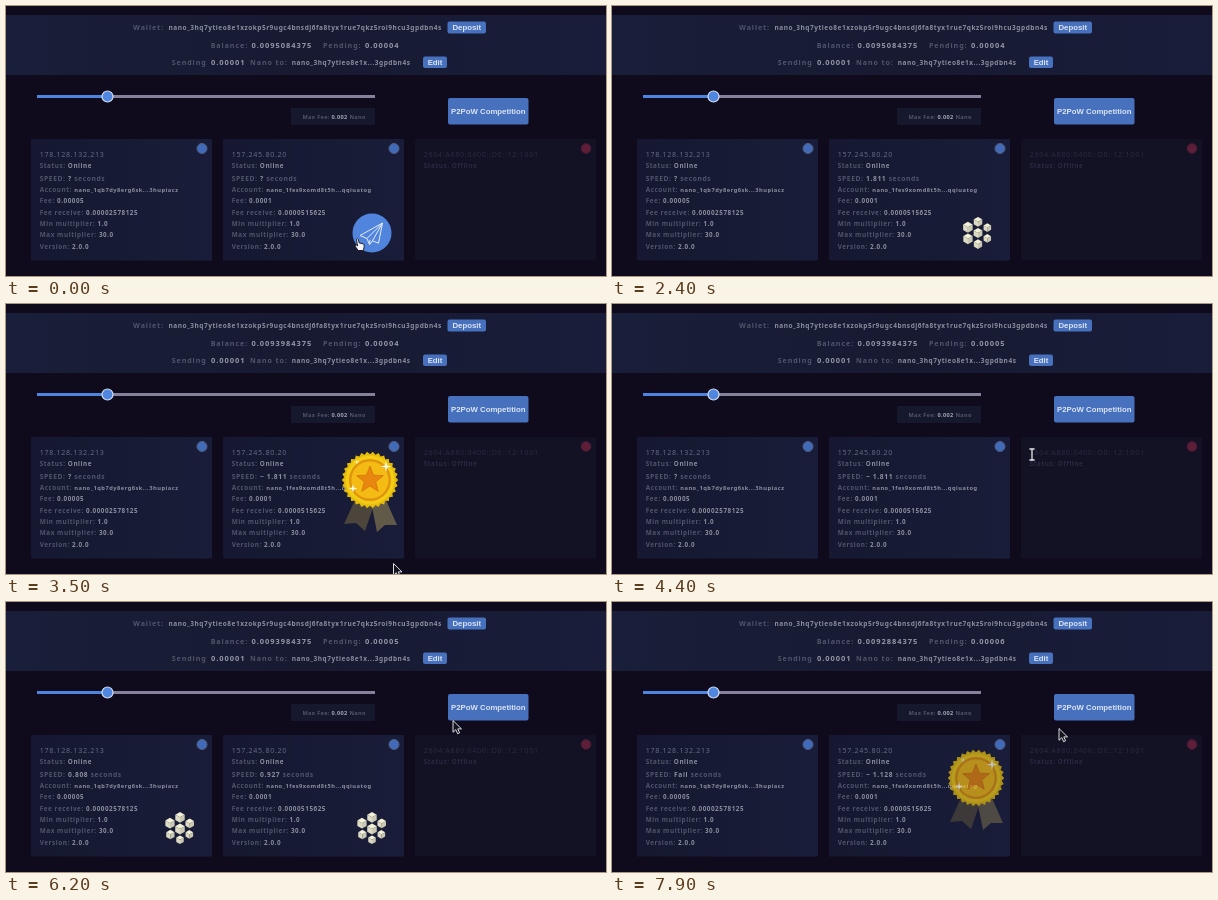
An HTML page that plays this animation: 600x270 px, repeating every 8000 ms.

```html
<!DOCTYPE html>
<html lang="en">
<head>
<meta charset="utf-8">
<title>P2PoW Competition</title>
<style>
html, body { margin: 0; width: 100%; height: 100%; overflow: hidden; background: #0f0b1d; }
svg { display: block; width: 600px; height: 270px; }
text { font-family: "Noto Sans", "Open Sans", sans-serif; font-weight: 600; white-space: pre; fill: #51556b; }
.v { font-weight: 700; fill: #8c8f9f; }
.head { font-size: 7.1px; letter-spacing: .92px; }
.head.v { font-size: 7.5px; letter-spacing: .95px; fill: #9598a8; }
.head.key { font-size: 6.5px; letter-spacing: .53px; fill: #8b8e9f; }
.row { font-size: 6.35px; letter-spacing: .57px; }
.row .v { font-size: 6.3px; letter-spacing: .55px; }
.row .key { font-size: 5.7px; letter-spacing: .5px; }
.speed, .speed .v { font-size: 6.7px; letter-spacing: .62px; }
.ip { font-size: 7.1px; letter-spacing: .7px; font-weight: 400; fill: #666a80; }
.off text, .off .v { fill: #292b43; }
.fee { font-size: 5.6px; letter-spacing: .33px; }
.fee .v { fill: #a5a8b6; }
.btn { font: 700 7.8px "Liberation Sans", Arial, sans-serif; fill: #dce5f6; text-anchor: middle; }
</style>
</head>
<body>
<svg id="stage" viewBox="0 0 600 270">
  <defs>
    <linearGradient id="bar">
      <stop offset="0" stop-color="#191e3a"/><stop offset=".5" stop-color="#171a31"/><stop offset="1" stop-color="#1a1d3a"/>
    </linearGradient>
    <linearGradient id="panel">
      <stop offset="0" stop-color="#151830"/><stop offset="1" stop-color="#191d39"/>
    </linearGradient>
    <clipPath id="card2"><rect x="217" y="133" width="181" height="122"/></clipPath>
  </defs>
  <rect width="600" height="270" fill="#0f0b1d"/>
  <rect y="9" width="600" height="60" fill="url(#bar)"/>
  <g id="page"></g>
  <g id="slider">
    <path d="M101 90.5H369" stroke="#85819a" stroke-width="2.8"/>
    <path d="M31 90.5H101" stroke="#4d84e0" stroke-width="2.8"/>
    <circle cx="101.5" cy="90.5" r="5.5" fill="#4f86e0" stroke="#d3dcef" stroke-width="1.2"/>
    <rect x="285" y="102" width="84" height="17" rx="1" fill="#16182e"/>
    <text class="fee" x="296.5" y="113">Max Fee: <tspan class="v">0.002</tspan> Nano</text>
  </g>
  <g id="send">
    <circle cx="366" cy="227" r="19.5" fill="#5185dd"/>
    <path d="M376.5 217L354 229.5L361 232.5L363.5 238.5L366.5 234.8L372.5 237.2ZL361 232.5M376.5 217L366.5 234.8M363.5 238.5L364 233.7"
      fill="none" stroke="#e4ecfa" stroke-width="1" stroke-linejoin="round"/>
  </g>
  <g id="spinners"></g>
  <g clip-path="url(#card2)"><g id="medal"></g></g>
  <g id="cursor">
    <path id="arrow" d="M0 0V11.8L2.8 9.2L4.6 13.2L6.6 12.3L4.8 8.4H8.5Z" fill="#15131d" stroke="#f2f2f4" stroke-width=".9"/>
    <path id="hand" d="M-2.6 -3.2Q-1.7 -4.6 -.8 -3.2L.2 .4L4.4 1.4Q5.4 2 5.2 4L4.4 8H-.8L-4 3.6Q-4.2 2.2 -2.6 2.6L-1.4 3.4Z"
      fill="#f4f4f6" stroke="#14121a" stroke-width=".9"/>
    <path id="beam" d="M-2.6 -5.5H-.6L0 -5L.6 -5.5H2.6M0 -5V5M-2.6 5.5H-.6L0 5L.6 5.5H2.6" fill="none" stroke="#e6e6ea" stroke-width="1.3"/>
  </g>
</svg>
<script>
const LOOP = 8000, STEP = 100;
const WIN1 = 2600, WIN2 = 6700;
const $ = id => document.getElementById(id);

function add(parent, tag, attrs, text) {
  const el = document.createElementNS('http://www.w3.org/2000/svg', tag);
  for (const k in attrs) el.setAttribute(k, attrs[k]);
  if (text !== undefined) el.textContent = text;
  parent.append(el);
  return el;
}
const clamp = x => Math.max(0, Math.min(1, x));
const polar = (r, deg) => [r * Math.cos(deg * Math.PI / 180), r * Math.sin(deg * Math.PI / 180)];
const points = list => list.map(p => p.map(n => n.toFixed(2)).join()).join(' ');
const page = $('page');
const label = (x, y, cls, text) => add(page, 'text', { x, y, class: cls }, text);

function button(x, y, w, h, text) {
  add(page, 'rect', { x, y, width: w, height: h, rx: 2, fill: '#4770bd' });
  label(x + w / 2, y + h / 2 + 2.8, 'btn', text);
}

// Header
const wallet = 'nano_3hq7ytieo8e1xzokp5r9ugc4bnsdj6fa8tyx1rue7qkz5roi9hcu3gpdbn4s';
label(127, 24, 'head', 'Wallet:');
label(162.5, 24, 'head v key', wallet);
button(441.5, 15.5, 38.5, 12, 'Deposit');
label(204.7, 41.5, 'head', 'Balance:');
const balance = label(245.5, 41.5, 'head v', '');
label(317, 41.5, 'head', 'Pending:');
const pending = label(359, 41.5, 'head v', '');
label(165.7, 59, 'head', 'Sending');
label(205, 59, 'head v', '0.00001');
label(244, 59, 'head', 'Nano to:');
label(285.7, 59, 'head v key', wallet.slice(0, 18) + '...' + wallet.slice(-8));
button(417, 50.5, 24, 11.5, 'Edit');
button(442, 92, 80.5, 26.5, 'P2PoW Competition');

// Cards
function card(x, ip, rows, on) {
  const g = add(page, 'g', on ? {} : { class: 'off' });
  add(g, 'rect', { x, y: 133, width: 181, height: 121.5, rx: 1, fill: on ? 'url(#panel)' : '#131124' });
  add(g, 'circle', { cx: x + 171, cy: 142.5, r: 5, fill: on ? '#416bb9' : '#5e1e38', stroke: on ? '#4f5f82' : '#3b1a30', 'stroke-width': 1 });
  add(g, 'text', { x: x + 8.7, y: 150.5, class: 'ip' }, ip);
  let speed;
  rows.forEach(([name, value], i) => {
    const y = i ? 163.2 + i * 11.35 : 162;
    const t = add(g, 'text', { x: x + 8.7, y, class: name === 'SPEED' ? 'row speed' : 'row' });
    add(t, 'tspan', {}, name + ': ');
    const v = add(t, 'tspan', { class: name === 'Account' ? 'v key' : 'v' }, value);
    if (name === 'SPEED') {
      speed = v;
      add(t, 'tspan', {}, ' seconds');
    }
  });
  return speed;
}
const rows = (account, fee, receive) => [
  ['Status', 'Online'], ['SPEED', '?'], ['Account', account], ['Fee', fee], ['Fee receive', receive],
  ['Min multiplier', '1.0'], ['Max multiplier', '30.0'], ['Version', '2.0.0']
];
const speed1 = card(25, '178.128.132.213', rows('nano_1qb7dy8erg6sk...3hupiacz', '0.00005', '0.00002578125'), true);
const speed2 = card(217, '157.245.80.20', rows('nano_1fes9xomd8t5h...qqiuatog', '0.0001', '0.0000515625'), true);
card(409, '2604:A880:0400::D0::12:1001', [['Status', 'Offline']], false);

// Loader: six cubes around one
function makeSpinner(x) {
  const g = add($('spinners'), 'g', { transform: `translate(${x} 227)` });
  const faces = [[210, 270, 330, '#f1efd6'], [90, 150, 210, '#dddbc4'], [330, 30, 90, '#cbc9b3']];
  g.cubes = Array.from({ length: 7 }, () => {
    const c = add(g, 'g', {});
    for (const [a, b, d, fill] of faces)
      add(c, 'polygon', { points: points([[0, 0], polar(4.9, a), polar(4.9, b), polar(4.9, d)]), fill });
    return c;
  });
  return g;
}
function drawSpinner(g, on, t) {
  g.style.display = on ? '' : 'none';
  g.cubes.forEach((c, i) => {
    const wave = Math.sin(t / 1200 * 2 * Math.PI - i);
    const [x, y] = i < 6 ? polar(11.2 + wave * .5, i * 60 - 90) : [0, 0];
    c.setAttribute('transform', `translate(${x} ${y}) scale(${1 + wave * .13})`);
  });
}
const spin1 = makeSpinner(174), spin2 = makeSpinner(366);

// Medal around its own centre
const medal = $('medal');
const ring = (n, outer, inner, start) =>
  points(Array.from({ length: n * 2 }, (_, i) => polar(i % 2 ? inner : outer, start + i * 180 / n)));
add(medal, 'polygon', { points: '-15,20 -26,44 -14,43 -5,51 5,22', fill: '#4c453b' });
add(medal, 'polygon', { points: '1,22 7,52 15,45 27,45 15,18', fill: '#625a48' });
add(medal, 'polygon', { points: ring(30, 28.3, 25.8, 0), fill: '#e6ba0b' });
[[24.5, '#f2cc14'], [21, '#e0930f'], [18.6, '#f3bb14']].forEach(([r, fill]) => add(medal, 'circle', { r, fill }));
add(medal, 'polygon', { points: ring(5, 14, 6, -90), fill: '#e8860f', stroke: '#d5740c', 'stroke-width': .8 });
for (const [x, y, r] of [[16, -13.5, 5.5], [-17, 8.5, 4.5], [-13, -18, 2.5]])
  add(medal, 'polygon', { points: ring(4, r, r * .28, 0), transform: `translate(${x} ${y})`, fill: '#fffbe6' });

function drawMedal(t) {
  const age = t - (t < WIN2 ? WIN1 : WIN2);
  const rise = 1 - (1 - clamp(age / 780)) ** 2;
  medal.style.display = age < 0 || age > 1600 ? 'none' : '';
  medal.setAttribute('transform', `translate(364 ${262 - 86 * rise})`);
  medal.setAttribute('opacity', 1 - clamp((age - 1050) / 550));
}

// Text that fades out, swaps and fades in at each change
function drawFading(el, first, changes, t) {
  let text = first, alpha = 1;
  for (const [at, next] of changes) {
    if (t >= at) text = next;
    alpha = Math.min(alpha, Math.max(.08, Math.abs(t - at) / 300));
  }
  el.textContent = text;
  el.setAttribute('opacity', clamp(alpha));
}
const count = ms => (ms / 1000).toFixed(3);

function drawSpeeds(t) {
  speed1.textContent = t < 5392 ? '?' : t < 6900 ? count(Math.min(t, 6401) - 5392) : 'Fail';
  speed1.setAttribute('fill-opacity', t < 6900 ? 1 : clamp(.08 + (t - 6900) / 500));
  speed2.textContent =
    t < 500 ? '?' :
    t < WIN1 ? count(Math.min(t - 500, 1811)) :
    t < 5273 ? '~ 1.811' :
    t < WIN2 ? count(Math.min(t - 5273, 1128)) : '~ 1.128';
}

// Pointer: time, x, y, shape from that time on
const track = [
  [0, 353, 236.5, 'hand'], [600, 353, 236.5, 'arrow'], [900, 388, 285, 'arrow'], [3100, 388, 285, 'arrow'],
  [3500, 387.5, 259.5, 'arrow'], [4000, 387.5, 259.5, 'arrow'], [4400, 420, 150.5, 'beam'], [4600, 420, 150.5, 'arrow'],
  [5100, 448, 110, 'hand'], [5900, 448, 110, 'hand'], [6200, 447, 118.5, 'arrow'], [6500, 447, 118.5, 'arrow'],
  [6900, 447, 126.5, 'arrow'], [LOOP, 447, 126.5, 'arrow']
];
function drawCursor(t) {
  const i = track.findIndex((k, n) => t >= k[0] && t < track[n + 1][0]);
  const [t0, x0, y0, shape] = track[i], [t1, x1, y1] = track[i + 1];
  const p = (t - t0) / (t1 - t0), e = p * p * (3 - 2 * p);
  $('cursor').setAttribute('transform', `translate(${x0 + (x1 - x0) * e} ${y0 + (y1 - y0) * e})`);
  for (const id of ['arrow', 'hand', 'beam']) $(id).style.display = id === shape ? '' : 'none';
}

function draw(now) {
  const t = Math.floor(now % LOOP / STEP) * STEP;
  drawFading(balance, '0.0095084375', [[3000, '0.0093984375'], [7080, '0.0092884375']], t);
  drawFading(pending, '0.00004', [[4000, '0.00005'], [7080, '0.00006']], t);
  drawSpeeds(t);
  $('send').style.display = t < 500 ? '' : 'none';
  drawSpinner(spin1, t >= 5392 && t < WIN2, t);
  drawSpinner(spin2, (t >= 500 && t < WIN1) || (t >= 5273 && t < WIN2), t);
  drawMedal(t);
  drawCursor(t);
}
const begin = performance.now();
function tick() {
  draw(performance.now() - begin);
  requestAnimationFrame(tick);
}
tick();
</script>
</body>
</html>
```
